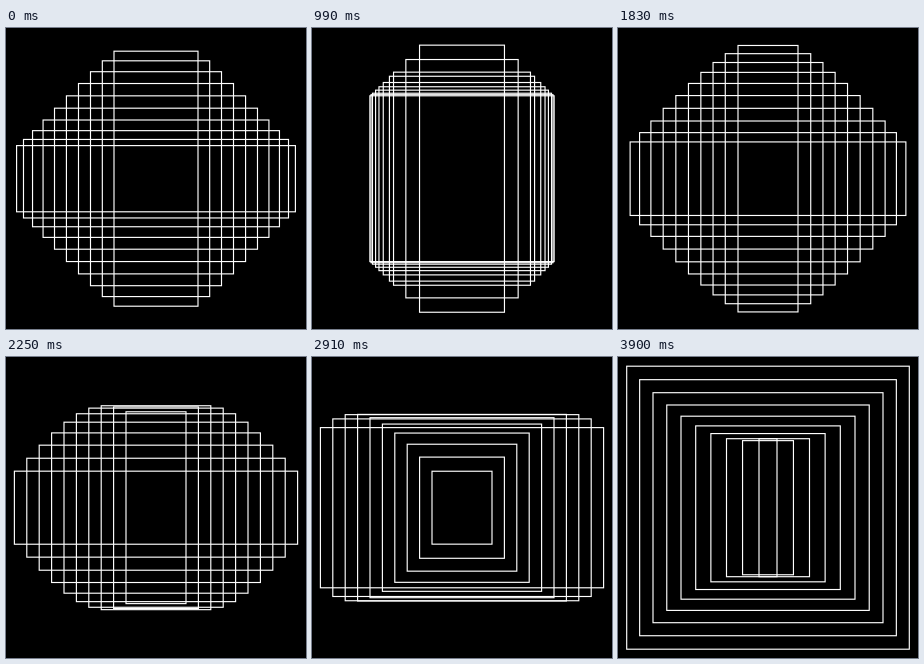
These frames come from a looping animation (300x301 px, 3930 ms). An HTML page with a canvas:

```html
<!DOCTYPE html>
<html lang="en">
<head>
<meta charset="utf-8">
<title>Nested rectangles</title>
<style>
  html, body { margin: 0; width: 100%; height: 100%; overflow: hidden; background: #000; }
  canvas { display: block; }
</style>
</head>
<body>
<canvas id="stage" width="300" height="301"></canvas>
<script>
const LOOP = 3930;
const COUNT = 10;
const CENTER = { x: 150, y: 150.7 };
const ctx = document.getElementById('stage').getContext('2d');

// Each pose gives half sizes at these ring indices; the rings between follow a smooth curve.
const NODES = [0, 2, 5, 7, 9];
const REST = NODES.map(j => 30 + 12.4 * j);
const POSES = [
  { t: 0,    w: [42, 65.5, 101.5, 123.5, 139.5], h: [127.5, 107, 70.5, 48, 33] },
  { t: 450,  w: [42, 68, 97.5, 105, 97.5],       h: [130.5, 104.5, 76, 68.5, 75.5] },
  { t: 990,  w: [42.5, 68.5, 91, 89.5, 72.5],    h: [133.5, 106.5, 84, 85.5, 102.5] },
  { t: 1110, w: [37, 63.5, 91, 95, 85],          h: [140, 113, 85, 81, 91] },
  { t: 1440, w: [30, 55, 91.5, 109.5, 116.5],    h: [146, 121, 84, 66.5, 58] },
  { t: 1650, w: [30, 55, 92, 115, 131],          h: [143, 119.5, 83, 60, 44] },
  { t: 2250, w: REST,                            h: [96, 102, 85.5, 62.5, 36.5] },
  { t: 2910, w: REST,                            h: [36.5, 63.5, 90, 93, 80] },
  { t: 3300, w: [29.5, 54.5, 92, 116.7, 141.5],  h: [32, 57, 91, 109, 119.5] },
  { t: 3900, w: [9, 41.5, 87, 115, 141.3],       h: [69, 69, 91.5, 115, 141.5] }
];

// Lagrange weights of every node for ring j
const weights = Array.from({ length: COUNT }, (_, j) =>
  NODES.map(a => NODES.reduce((p, b) => a === b ? p : p * (j - b) / (a - b), 1)));

const ring = (values, j) => values.reduce((sum, v, n) => sum + v * weights[j][n], 0);

function slope(k, axis, n) {
  const rate = i => (POSES[i + 1][axis][n] - POSES[i][axis][n]) / span(i);
  const span = i => POSES[i + 1].t - POSES[i].t;
  if (k === 0) return rate(0);
  if (k === POSES.length - 1) return rate(k - 1);
  return (rate(k - 1) * span(k) + rate(k) * span(k - 1)) / (span(k - 1) + span(k));
}

// Cubic Hermite between the two poses around t
function sample(t, axis) {
  let k = 0;
  while (k < POSES.length - 2 && t >= POSES[k + 1].t) k++;
  const a = POSES[k], b = POSES[k + 1];
  const d = b.t - a.t;
  const u = Math.min((t - a.t) / d, 1);
  const s = u * u * (3 - 2 * u);
  return NODES.map((_, n) =>
    a[axis][n] * (1 - s) + b[axis][n] * s +
    d * u * (1 - u) * (slope(k, axis, n) * (1 - u) - slope(k + 1, axis, n) * u));
}

function draw(t) {
  ctx.fillStyle = '#000';
  ctx.fillRect(0, 0, 300, 301);
  ctx.strokeStyle = '#fff';
  ctx.lineWidth = 1.15;
  const w = sample(t, 'w'), h = sample(t, 'h');
  for (let j = 0; j < COUNT; j++) {
    const rw = ring(w, j), rh = ring(h, j);
    ctx.strokeRect(CENTER.x - rw, CENTER.y - rh, 2 * rw, 2 * rh);
  }
}

const start = performance.now();
function tick() {
  draw((performance.now() - start) % LOOP);
  requestAnimationFrame(tick);
}
tick();
</script>
</body>
</html>
```
